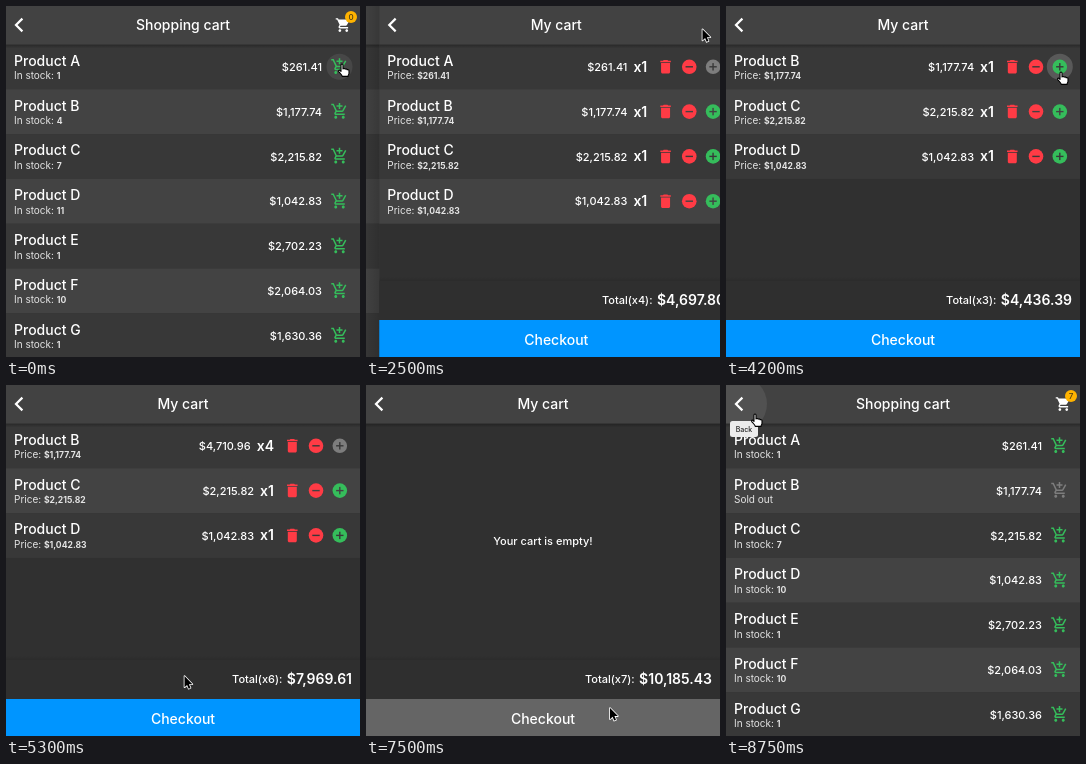
Write an HTML page with a canvas that moves like this. It is 354 px wide and 351 px high and loops after 8890 ms.

```html
<!DOCTYPE html>
<html lang="en">
<head>
<meta charset="utf-8">
<title>Shopping cart</title>
<style>
html, body { margin: 0; width: 100%; height: 100%; overflow: hidden; background: #303030; }
canvas { display: block; width: 354px; height: 351px; }
</style>
</head>
<body>
<canvas id="stage"></canvas>
<script>
const W = 354, H = 351, LOOP = 8890, BAR = 38.5, ROW = 44.8;
const canvas = document.getElementById('stage');
const ctx = canvas.getContext('2d');
const dpr = window.devicePixelRatio || 1;
canvas.width = W * dpr;
canvas.height = H * dpr;

const GREEN = '#35bd5b', RED = '#ff3b45', GREY = '#7d7d7d', WHITE = '#fff';
const PRODUCTS = [
  ['A', 261.41, 1], ['B', 1177.74, 4], ['C', 2215.82, 7], ['D', 1042.83, 11],
  ['E', 2702.23, 1], ['F', 2064.03, 10], ['G', 1630.36, 1]
].map(([id, price, stock]) => ({ id, price, stock }));

const wheels = 'M7 18c-1.1 0-1.99.9-1.99 2S5.9 22 7 22s2-.9 2-2-.9-2-2-2zM17 18c-1.1 0-1.99.9-1.99 2s.89 2 1.99 2 2-.9 2-2-.9-2-2-2z';
const ICONS = {
  add: new Path2D('M11 9h2V6h3V4h-3V1h-2v3H8v2h3zM7.17 14.75l.03-.12.9-1.63h7.45c.75 0 1.41-.41 1.75-1.03l3.86-7.01L19.42 4h-.01l-1.1 2-2.76 5H8.53l-.13-.27L6.16 6l-.95-2-.94-2H1v2h2l3.6 7.59-1.35 2.45c-.16.28-.25.61-.25.96 0 1.1.9 2 2 2h12v-2H7.42c-.13 0-.25-.11-.25-.25z' + wheels),
  cart: new Path2D('M1 2v2h2l3.6 7.59-1.35 2.45c-.16.28-.25.61-.25.96 0 1.1.9 2 2 2h12v-2H7.42c-.14 0-.25-.11-.25-.25l.03-.12.9-1.63h7.45c.75 0 1.41-.41 1.75-1.03l3.58-6.49c.08-.14.12-.31.12-.48 0-.55-.45-1-1-1H5.21l-.94-2z' + wheels),
  trash: new Path2D('M6 19c0 1.1.9 2 2 2h8c1.1 0 2-.9 2-2V7H6zM19 4h-3.5l-1-1h-5l-1 1H5v2h14z')
};
const ARROW = new Path2D('M0 0V11.2L2.6 8.8L4.2 12.6L6 11.8L4.4 8.1H7.9Z');
const HAND = new Path2D('M-1 1C-1 -.3 1 -.3 1 1V5C1.4 4.2 3 4.3 3.1 5.2C3.7 4.6 5 4.8 5.1 5.8C6 5.3 7 5.8 7 6.8V9.2C7 10.6 6.1 11 6 12.4H.3C.1 11 -1.6 9.6 -3.2 7.6C-4 6.4 -2.6 5.7 -1.8 6.6L-1 7.4Z');

// time, x, y of the pointer tip
const TRACK = [
  [0, 336, 58], [100, 337, 59], [200, 337, 60], [400, 337, 60], [800, 334, 100], [1000, 334, 101],
  [1200, 333, 145], [1400, 333, 146], [1700, 329, 194], [1900, 329, 195], [2200, 337, 19], [2400, 337, 20],
  [2900, 332, 51], [3050, 331, 52], [3300, 287, 60], [3500, 287, 61], [4000, 335, 65],
  [4100, 335, 66], [4800, 335, 66], [5200, 151, 325], [5600, 327, 108], [5700, 327, 108],
  [6000, 322, 107], [6200, 322, 107], [6400, 289, 104], [6600, 289, 104], [7200, 245, 322],
  [7500, 244, 323], [8200, 28, 39], [8400, 28, 39], [8500, 29, 29], [LOOP, 29, 29]
];
const PRESSES = [0, 800, 1300, 1800, 2200, 3300, 4200, 4400, 4600, 6100, 6400];

const rowMid = i => BAR + ROW * i + 22.3;
const money = v => '$' + v.toLocaleString('en-US', { minimumFractionDigits: 2, maximumFractionDigits: 2 });

function bezier(x1, y1, x2, y2) {
  const at = (a, b, s) => 3 * (1 - s) * (1 - s) * s * a + 3 * (1 - s) * s * s * b + s * s * s;
  return x => {
    let lo = 0, hi = 1;
    for (let i = 0; i < 24; i++) {
      const mid = (lo + hi) / 2;
      if (at(x1, x2, mid) < x) lo = mid; else hi = mid;
    }
    return at(y1, y2, lo);
  };
}
const easePush = bezier(.35, .91, .33, .97);
const easePop = bezier(.67, .03, .65, .09);

// Progress of the cart page over the list page
function coverage(t) {
  if (t < 2250 || t >= 8720) return 0;
  if (t < 2650) return easePush((t - 2250) / 400);
  return t < 8500 ? 1 : easePop((8720 - t) / 400);
}

function pointer(t) {
  const k = TRACK.findIndex((p, i) => i && p[0] >= t);
  const [t0, x0, y0] = TRACK[k - 1], [t1, x1, y1] = TRACK[k];
  const u = (t - t0) / (t1 - t0), e = u * u * (3 - 2 * u);
  return { x: x0 + (x1 - x0) * e, y: y0 + (y1 - y0) * e };
}

function stateAt(t) {
  const since = (...times) => times.filter(x => t >= x).length;
  const taken = [since(400), since(900), since(1400), since(1900)];
  const done = t >= 8000;
  const qty = [1, 1 + since(4300, 4500, 4600), 1 + since(6200), 1];
  const counted = PRODUCTS.slice(0, 4).map((p, i) => i || t < 3400 ? qty[i] : 0);
  return {
    stock: PRODUCTS.map((p, i) => done ? [1, 0, 7, 10][i] ?? p.stock : p.stock - (taken[i] || 0)),
    badge: done ? 7 : since(100, 900, 1400, 1900),
    lines: [0, 1, 2, 3].filter(i => t < 7400 && !(i === 0 && t >= 3400) && !(i === 2 && t >= 6400)),
    qty,
    count: counted.reduce((a, b) => a + b),
    total: counted.reduce((sum, n, i) => sum + n * PRODUCTS[i].price, 0)
  };
}

function text(str, x, y, size, weight = 500, align = 'left', color = WHITE) {
  ctx.font = `${weight} ${size}px Inter, "Noto Sans", sans-serif`;
  ctx.textAlign = align;
  ctx.fillStyle = color;
  ctx.fillText(str, x, y);
  return ctx.measureText(str).width;
}

function rect(x, y, w, h, color) {
  ctx.fillStyle = color;
  ctx.fillRect(x, y, w, h);
}

function disc(x, y, r, color) {
  ctx.fillStyle = color;
  ctx.beginPath();
  ctx.arc(x, y, r, 0, Math.PI * 2);
  ctx.fill();
}

function fade(x0, y0, x1, y1, from, to) {
  const g = ctx.createLinearGradient(x0, y0, x1, y1);
  g.addColorStop(0, `rgba(0,0,0,${from})`);
  g.addColorStop(1, `rgba(0,0,0,${to})`);
  return g;
}

function icon(name, x, y, size, color) {
  ctx.save();
  ctx.translate(x - size / 2, y - size / 2);
  ctx.scale(size / 24, size / 24);
  ctx.fillStyle = color;
  ctx.fill(ICONS[name]);
  ctx.restore();
}

// Round button highlight; returns whether the pointer is over it
function hover(ui, x, y, r = 13) {
  if (!ui.live || Math.hypot(ui.x - x, ui.y - y) > r) return false;
  const pressed = PRESSES.some(p => ui.t >= p && ui.t < p + 150 && p > 0);
  disc(x, y, r, `rgba(255,255,255,${pressed ? .17 : .08})`);
  return ui.hand = true;
}

function roundSign(x, y, color, back, plus) {
  disc(x, y, 7.3, color);
  rect(x - 3.7, y - .7, 7.4, 1.4, back);
  if (plus) rect(x - .7, y - 3.7, 1.4, 7.4, back);
}

function appBar(title, ui) {
  rect(0, BAR, W, 4, fade(0, BAR, 0, BAR + 4, .28, 0));
  rect(0, 0, W, BAR, '#424242');
  if (ui.live && ui.y < BAR) {
    ctx.save();
    ctx.beginPath();
    ctx.rect(0, 0, W, BAR);
    ctx.clip();
    hover(ui, 13, 19, 28);
    ctx.restore();
  }
  ctx.strokeStyle = WHITE;
  ctx.lineWidth = 2.2;
  ctx.beginPath();
  ctx.moveTo(16.4, 12.6);
  ctx.lineTo(10, 19);
  ctx.lineTo(16.4, 25.4);
  ctx.stroke();
  text(title, W / 2, 24, 14, 500, 'center');
}

function rowBase(i, id) {
  const back = i % 2 ? '#434343' : '#383838';
  rect(0, BAR + ROW * i, W, ROW, back);
  text('Product ' + id, 8, rowMid(i) - 1, 14);
  return back;
}

function note(label, value, y) {
  const w = text(label, 8, y, 10, 400, 'left', '#e4e4e4');
  text(value, 8 + w, y, 8.6, 700, 'left', '#e4e4e4');
}

function listPage(s, ui) {
  rect(0, 0, W, H, '#303030');
  PRODUCTS.forEach((p, i) => {
    const y = rowMid(i), left = s.stock[i];
    rowBase(i, p.id);
    if (left) note('In stock: ', left, y + 12.6);
    else note('Sold out', '', y + 12.6);
    text(money(p.price), 316, y + 4.2, 11, 500, 'right');
    if (left) hover(ui, 333.5, y);
    icon('add', 333.5, y - .3, 18, left ? GREEN : GREY);
  });
  appBar('Shopping cart', ui);
  hover(ui, 337, 19, 18);
  icon('cart', 337.3, 19, 16.5, WHITE);
  disc(345, 11, 6, '#ffb300');
  text(s.badge, 345, 13.8, 8, 500, 'center', '#4d3c12');
}

function cartPage(s, ui) {
  rect(0, 0, W, H, '#303030');
  s.lines.forEach((id, i) => {
    const p = PRODUCTS[id], n = s.qty[id], y = rowMid(i);
    const back = rowBase(i, p.id);
    const more = n < p.stock;
    note('Price: ', money(p.price), y + 12.6);
    const w = text('x' + n, 268, y + 5, 14, 600, 'right');
    text(money(p.price * n), 262 - w, y + 4.2, 11, 500, 'right');
    hover(ui, 286.3, y);
    icon('trash', 286.3, y, 18, RED);
    hover(ui, 310, y, 12);
    roundSign(310, y, RED, back, false);
    if (more) hover(ui, 333.8, y);
    roundSign(333.8, y, more ? GREEN : GREY, back, true);
  });
  const empty = !s.lines.length;
  if (empty) text('Your cart is empty!', W / 2, 160.3, 11, 500, 'center');

  rect(0, 271, W, 4, fade(0, 271, 0, 275, 0, .1));
  rect(0, 275, W, 39, '#2f2f2f');
  const w = text(money(s.total), 346, 299, 14, 600, 'right');
  text(`Total(x${s.count}):`, 341.5 - w, 298, 11, 500, 'right');

  rect(0, 314, W, 37, empty ? '#656565' : '#0095ff');
  text('Checkout', W / 2, 338.5, 14, 500, 'center');
  if (ui.live && !empty && ui.y >= 314) ui.hand = true;
  appBar('My cart', ui);
}

function tooltip() {
  ctx.fillStyle = '#ececec';
  ctx.beginPath();
  ctx.roundRect(4, 36, 28, 16, 2.5);
  ctx.fill();
  text('Back', 18, 46.7, 7, 500, 'center', '#222');
}

function drawPointer(ui) {
  ctx.save();
  ctx.translate(ui.x, ui.y);
  ctx.lineJoin = 'round';
  ctx.lineWidth = ui.hand ? 1.1 : 1.6;
  const shape = ui.hand ? HAND : ARROW;
  ctx.fillStyle = ui.hand ? WHITE : '#000';
  ctx.strokeStyle = ui.hand ? '#000' : WHITE;
  if (ui.hand) ctx.fill(shape);
  ctx.stroke(shape);
  if (!ui.hand) ctx.fill(shape);
  ctx.restore();
}

function draw(t) {
  const s = stateAt(t), p = coverage(t);
  const ui = { ...pointer(t), t, hand: false, live: false };
  ctx.setTransform(dpr, 0, 0, dpr, 0, 0);
  if (p < 1) {
    ui.live = p < .5;
    ctx.save();
    ctx.translate(-W / 3 * p, 0);
    listPage(s, ui);
    ctx.restore();
  }
  if (p > 0) {
    ui.live = p >= .5;
    ctx.save();
    ctx.translate(W * (1 - p), 0);
    if (p < 1) rect(-16, 0, 16, H, fade(-16, 0, 0, 0, 0, .16));
    cartPage(s, ui);
    ctx.restore();
  }
  if (t >= 8500) tooltip();
  drawPointer(ui);
}

// The picture advances ten times a second, with a longer hold at the end
function step(t) {
  if (t >= 8750) return 8750;
  return Math.min(8600, Math.floor(t / 100) * 100);
}

const start = performance.now();
function tick() {
  draw(step((performance.now() - start) % LOOP));
  requestAnimationFrame(tick);
}
tick();
</script>
</body>
</html>
```
